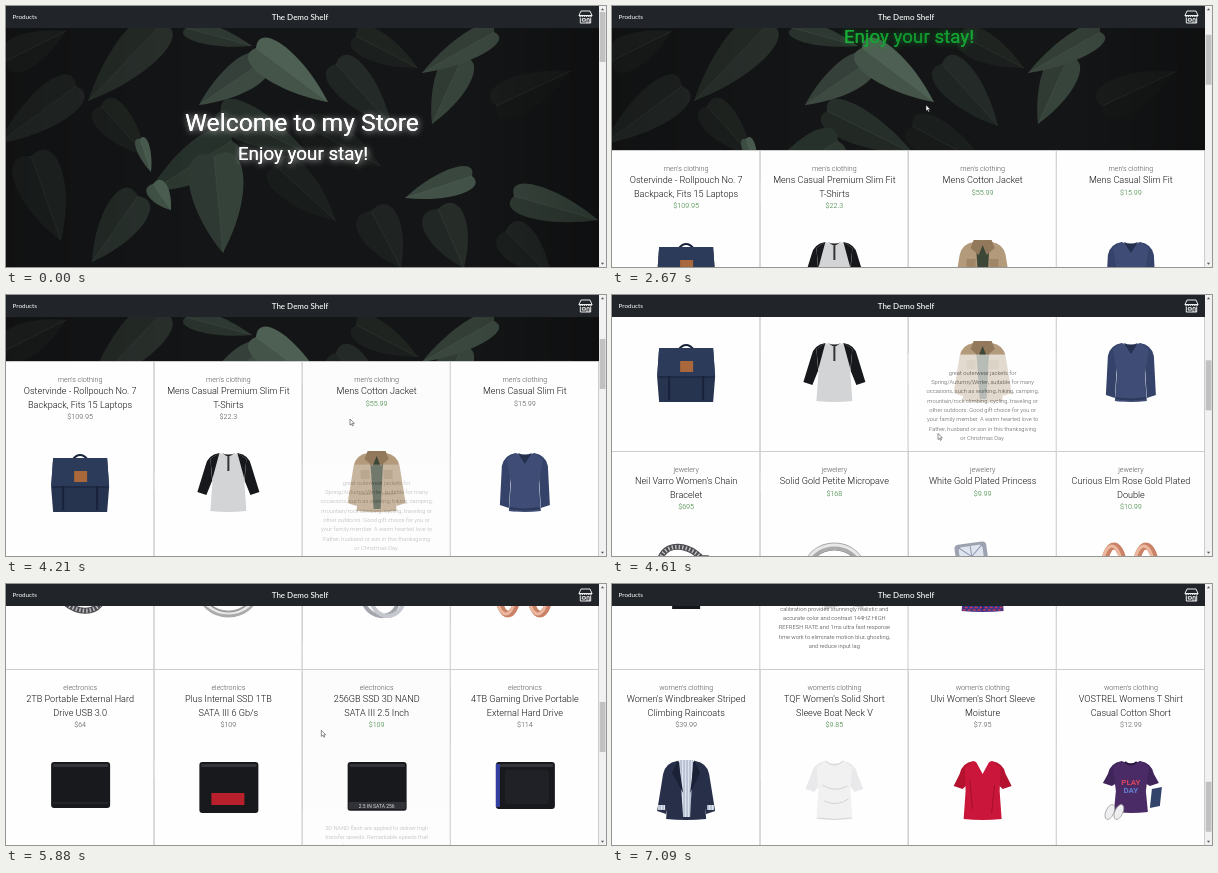
Animation, 600 px wide and 261 px high, one loop 7.42 s. Source, as an HTML page:

```html
<!DOCTYPE html>
<html lang="en">
<head>
<meta charset="utf-8">
<title>Store</title>
<style>
  html, body { margin: 0; width: 100%; height: 100%; overflow: hidden; background: #fdfdfd; }
  svg { display: block; width: 600px; height: 261px; }
  text { font-family: Roboto, sans-serif; text-anchor: middle; }
  .cat { font-size: 7.1px; font-weight: 300; fill: #555; }
  .title { font-size: 9.1px; font-weight: 300; fill: #111; }
  .price { font-size: 7.2px; font-weight: 300; }
  .desc { font-size: 5.75px; font-weight: 300; fill: #333; }
  .nav text { font-family: Lato, sans-serif; fill: #fff; }
  .big { font-size: 24.7px; font-weight: 400; }
  .sub { font-size: 18.8px; font-weight: 400; }
  #leaves { filter: blur(.5px); }
  #white { fill: #fff; filter: drop-shadow(0 0 .4px #fff) drop-shadow(1px 1px 3px rgba(255,255,255,.65)); }
  #green { fill: url(#neon); filter: drop-shadow(0 0 .4px #1b3) drop-shadow(0 0 3px rgba(10,170,40,.6)); }
</style>
</head>
<body>
<svg viewBox="0 0 600 261">
  <defs>
    <radialGradient id="neon" gradientUnits="userSpaceOnUse" cx="305" cy="130" r="115">
      <stop offset="0" stop-color="#0f8529"/><stop offset=".4" stop-color="#15a033"/><stop offset="1" stop-color="#22cc40"/>
    </radialGradient>
    <linearGradient id="shade">
      <stop offset="0" stop-color="#000" stop-opacity=".15"/><stop offset=".3" stop-color="#000" stop-opacity="0"/>
      <stop offset=".8" stop-color="#000" stop-opacity="0"/><stop offset="1" stop-color="#000" stop-opacity=".25"/>
    </linearGradient>
    <linearGradient id="view" x2="0" y2="1">
      <stop offset="0" stop-color="#9aa7a5"/><stop offset=".35" stop-color="#3c6b3c"/>
      <stop offset=".65" stop-color="#8b4b3f"/><stop offset="1" stop-color="#24402c"/>
    </linearGradient>
    <pattern id="dots" width="5" height="5" patternUnits="userSpaceOnUse">
      <rect width="5" height="5" fill="#2d3690"/><path d="M0 1h3M2 3.5h3" stroke="#cf3a52" stroke-width="1.5"/>
    </pattern>
    <pattern id="stripes" width="3" height="3" patternUnits="userSpaceOnUse">
      <rect width="3" height="3" fill="#e4e8f0"/><path d="M1 0v3" stroke="#8e9cba"/>
    </pattern>
  </defs>
  <rect width="593" height="261" fill="#141516"/>
  <g id="leaves"></g>
  <rect width="593" height="261" fill="url(#shade)"/>
  <g id="page">
    <g id="white"><text class="big" x="296" y="125">Welcome to my Store</text><text class="sub" x="297" y="154">Enjoy your stay!</text></g>
    <g id="green"><text class="big" x="296" y="125">Welcome to my Store</text><text class="sub" x="297" y="154">Enjoy your stay!</text></g>
    <g id="cards"></g>
  </g>
  <g class="nav">
    <rect width="593" height="22" fill="#212529"/>
    <text x="6.5" y="13.2" style="font-size:6.3px;text-anchor:start">Products</text>
    <text x="294" y="13.6" style="font-size:8px;font-weight:500">The Demo Shelf</text>
    <g fill="none" stroke="#fff" stroke-width=".9">
      <path d="M575 5h9l2 4.5h-13zM573 9.5q1.1 2.6 2.2 0q1.1 2.6 2.2 0q1.1 2.6 2.2 0q1.1 2.6 2.2 0q1.1 2.6 2.2 0q1 2.6 2 0M574.3 11.5v5.5h10.4v-5.5M576.3 12.7h3v2.4h-3zM581 17v-4.3h2.2v4.3"/>
    </g>
  </g>
  <rect x="593" width="7" height="261" fill="#f1f1f1"/>
  <path d="M594.9 4.3l1.6-2l1.6 2zM594.9 256.7l1.6 2l1.6-2z" fill="#555"/>
  <rect id="thumb" x="593.7" width="5.8" height="50" fill="#c1c1c1"/>
  <path id="cursor" d="M0 0v6l1.4-1.2l1 2.1l1-.5l-1-2h1.9z" fill="#fff" stroke="#222" stroke-width=".5"/>
</svg>
<script>
const LOOP = 7420, FIRST = 970, LAST = 7090;
const $ = id => document.getElementById(id);
const clamp = v => Math.max(0, Math.min(1, v));

// Fixed backdrop foliage: base x, y, tip x, y, half width, colour
const leaf = (x, y, tx, ty, w, color) => {
  const dx = tx - x, dy = ty - y, len = Math.hypot(dx, dy), a = Math.atan2(dy, dx) * 180 / Math.PI;
  const half = s => `M0 0C${-.16 * len} ${s * w * 1.25} ${.42 * len} ${s * w * 1.35} ${len} 0Z`;
  return `<g transform="translate(${x} ${y}) rotate(${a})"><path d="${half(1)}${half(-1)}" fill="${color}"/>` +
    `<path d="${half(1)}" fill="#000" opacity=".13"/><path d="M0 0H${len}" stroke="#9db3a4" stroke-width=".6" opacity=".13"/></g>`;
};
$('leaves').innerHTML = [
  [70, 80, -8, 138, 21, '#222725'], [25, 150, 55, 235, 25, '#1f2422'], [0, 55, 60, 25, 18, '#1d201f'],
  [156, 18, 82, 95, 22, '#29302c'], [95, 100, 140, 150, 18, '#1f2421'], [132, 190, 86, 256, 21, '#29312d'],
  [330, 58, 386, 120, 20, '#242a27'], [350, 30, 412, 62, 16, '#1f2421'], [270, 160, 330, 215, 20, '#1c201e'],
  [365, 205, 395, 262, 22, '#1f2422'], [432, 203, 458, 262, 22, '#262d29'], [490, 100, 565, 65, 20, '#191c1b'],
  [500, 225, 545, 270, 20, '#202523'], [300, 120, 375, 160, 20, '#1a1e1c'], [215, 105, 302, 148, 19, '#272f2a'],
  [226, 135, 143, 186, 22, '#2d3831'], [208, 150, 217, 247, 28, '#35423a'], [180, 22, 246, 40, 11, '#2f3933'],
  [256, 56, 193, 99, 17, '#3c4a41'], [250, 42, 322, 96, 19, '#4e6053'], [456, 52, 426, 118, 18, '#37443b'],
  [488, 26, 416, 67, 14, '#3a473e'], [466, 170, 399, 192, 14, '#435248'], [508, 190, 592, 214, 17, '#38453d'],
  [134, 133, 145, 166, 7, '#4b5d51'], [147, 178, 165, 204, 11, '#4b5e51']
].map(a => leaf(...a)).join('');

// Product pictures, drawn around their own centre
const box = (x, y, w, h, f, r = 0) => `<rect x="${x}" y="${y}" width="${w}" height="${h}" rx="${r}" fill="${f}"/>`;
const path = (d, f, more = '') => `<path d="${d}" fill="${f}" ${more}/>`;
const line = (d, s, w = 1) => path(d, 'none', `stroke="${s}" stroke-width="${w}"`);
const oval = (x, y, rx, ry, s, w, more = '') =>
  `<ellipse cx="${x}" cy="${y}" rx="${rx}" ry="${ry}" fill="none" stroke="${s}" stroke-width="${w}" ${more}/>`;
const sleeves = (f, out, end) => [1, -1].map(s =>
  path(`M${9 * s} -28Q${21 * s} -26 ${23 * s} -15L${out * s} ${end}L${(out - 9) * s} ${end + 3}L${14 * s} -6Z`, f)).join('');
const torso = (f, w = 18, end = 30) =>
  path(`M-9 -28Q0 -23 9 -28L18 -22L${w - 2} 2L${w} ${end}Q0 ${end + 2} ${-w} ${end}L${2 - w} 2L-18 -22Z`, f);
const neck = (f, d = 9) => path(`M-7 -28L0 ${d - 28}L7 -28Q0 -25 -7 -28Z`, f);
const coat = (f, inner) => sleeves(f, 29, 22) + torso(f, 20) + path('M-7 -29H7L4 28H-3Z', inner);
const drive = (end, extra = '', f = '#18191d') => box(-29, -27, 59, end + 27, f, 3) + box(-27, -25, 55, 3, '#33353b') + extra;

const pics = [
  [
    line('M-8 -21Q0 -31 8 -21', '#18223a', 2) + path('M-27 -23H27L29 6L27 31H-27L-29 6Z', '#27344f') + path('M-27 -23H27L29 5H-29Z', '#2d3b5a') +
      line('M-17 5V29M17 5V29', '#18223a', 2) + line('M-28 6H28', '#17213a') + box(-6, -10, 13, 11, '#a9683b'),
    sleeves('#17181b', 31, 11) + torso('#d3d4d6') + path('M-9 -28L-18 -22L-16 -2ZM9 -28L18 -22L16 -2Z', '#17181b') + neck('#222', 4) + line('M0 -24V-10', '#333', 2),
    coat('#b39a7b', '#3d4737') + path('M-9 -30L-12 -22L-4 -15L0 -25L4 -15L12 -22L9 -30Z', '#92795c') +
      box(-16, -11, 9, 9, '#9f8667') + box(7, -11, 9, 9, '#9f8667') + line('M-18 13H-6M6 13H18', '#8a7256'),
    sleeves('#35436a', 25, 24) + torso('#3f4d76', 16) + neck('#252f4e', 11) + line('M-15 27Q0 30 15 27', '#2d395c', 2)
  ],
  [
    oval(-2, 0, 27, 20, '#4c4c50', 6, 'transform="rotate(38)"') + oval(-2, 0, 27, 20, '#bcbcc0', 4, 'stroke-dasharray="1.5 2" transform="rotate(38)"') +
      box(-22, 9, 9, 8, '#5a5a5e', 3) + box(15, -16, 9, 11, '#77777c', 3),
    oval(0, 0, 28, 25, '#aaa', 7) + oval(0, -1, 29, 25, '#e8e8e8', 3) + oval(0, 1, 25, 22, '#888', 1),
    oval(2, 8, 18, 20, '#a4a6ad', 4, 'transform="rotate(-15)"') + oval(11, 7, 17, 20, '#c6c8cf', 4) +
      `<g transform="translate(-11 -15) rotate(-8)">${box(-16, -13, 32, 27, '#9da2b0', 4)}${box(-12, -10, 24, 21, '#dfe4ee', 3)}${line('M-12 -10L12 11M12 -10L-12 11M0 -10V11', '#8f9ab3')}</g>`,
    [-17, 15].map(x => oval(x, 0, 10, 25, '#c98265', 7) + oval(x - 2, 0, 10, 25, '#ecb79f', 3)).join('')
  ],
  [
    drive(19, line('M-27 14H28', '#2f3137')),
    drive(24, box(-17, 4, 33, 12, '#b8202b')),
    drive(22, box(-28, 13, 57, 7, '#303238') + '<text y="19" style="font-size:5px;fill:#ddd">2.5 IN SATA 256</text>'),
    drive(20, box(-29, -25, 4, 43, '#333fa0') + box(-20, -19, 44, 34, '#202127', 3))
  ],
  [
    box(-30, -28, 60, 43, '#16171a') + box(-28, -26, 56, 38, 'url(#view)') + line('M-28 4Q-10 -14 5 0T28 -6', '#b4c169', 2) +
      path('M-3 15H3L4 26H14V30H-14V26H-4Z', '#16171a'),
    path('M-30 -21Q0 -21 30 -25V10Q0 4 -25 18Z', '#111216') + path('M-28 -19Q0 -19 23 -22V7Q-4 6 -24 15Z', '#20262e') +
      line('M9 9L12 24M12 24L-10 29M12 24L29 28', '#25262a', 3) +
      '<g transform="translate(16 -6) rotate(-6)"><text style="font-size:6px;font-weight:700;fill:#eee">WIDE</text><text y="6" style="font-size:6px;font-weight:700;fill:#eee">VIEW</text></g>',
    sleeves('url(#dots)', 30, 23) + torso('url(#dots)', 21, 32) + path('M-11 -20Q-13 -32 0 -32Q13 -32 11 -20Q0 -13 -11 -20Z', '#29327f') + line('M0 -18V31', '#1b2057'),
    sleeves('#202124', 29, 24) + torso('#292a2d', 17, 26) + path('M-9 -28L-12 -19L0 -8L12 -19L9 -28Z', '#111') + line('M2 -9L-1 26M-14 10H-6M7 10H14', '#5b5c60')
  ],
  [
    coat('#272f49', 'url(#stripes)') + path('M-8 -29L-14 -16L-3 4ZM8 -29L14 -16L4 4Z', '#1b2238') + box(-28, 16, 7, 5, 'url(#stripes)') + box(21, 16, 7, 5, 'url(#stripes)'),
    sleeves('#e9e9eb', 29, 0) + torso('#f1f1f2', 18) + line('M-9 -28Q0 -20 9 -28M-12 -4Q0 4 13 -3M-10 12Q2 18 14 10M-17 29Q0 32 17 29', '#d3d3d6'),
    sleeves('#b5122f', 29, -3) + torso('#c9163a', 19) + neck('#fff', 13) + line('M-13 -9L-10 20M12 -4L9 24', '#a60f2b'),
    path('M21 0L31 -2L29 17L19 19Z', '#33446b') + sleeves('#40255b', 28, -6) + torso('#4a2b66', 17, 23) + line('M-6 -27Q0 -22 6 -27', '#2c1842', 2) +
      '<text y="-4" style="font-size:8px;font-weight:700;fill:#d8465e">PLAY</text><text y="4" style="font-size:8px;font-weight:700;fill:#6380cf">DAY</text>' +
      [-21, -12].map(x => `<ellipse cx="${x}" cy="23" rx="4" ry="8" fill="#eeeef0" stroke="#999" stroke-width=".7" transform="rotate(24 ${x} 23)"/>`).join('')
  ]
];

const goods = [
  ["men's clothing", ['Ostervinde - Rollpouch No. 7|Backpack, Fits 15 Laptops', '$109.95'], ['Mens Casual Premium Slim Fit|T-Shirts', '$22.3'], ['Mens Cotton Jacket', '$55.99'], ['Mens Casual Slim Fit', '$15.99']],
  ['jewelery', ["Neil Varro Women's Chain|Bracelet", '$695'], ['Solid Gold Petite Micropave', '$168'], ['White Gold Plated Princess', '$9.99'], ['Curious Elm Rose Gold Plated|Double', '$10.99']],
  ['electronics', ['2TB Portable External Hard|Drive USB 3.0', '$64'], ['Plus Internal SSD 1TB|SATA III 6 Gb/s', '$109'], ['256GB SSD 3D NAND|SATA III 2.5 Inch', '$109'], ['4TB Gaming Drive Portable|External Hard Drive', '$114']],
  ['electronics', ['Yexo MK530L 21.5 inches Full|HD IPS Ultra-Thin', '$599'], ['Tarvond 49-Inch LPW40 –|Super Ultrawide Screen QLED', '$999.99'], ["QUORVANDELE Women's 3-in-1|Snowboard Jacket", '$56.99'], ["Dusk Women's Faux Leather|Moto Biker Jacket", '$29.95']],
  ["women's clothing", ["Women's Windbreaker Striped|Climbing Raincoats", '$39.99'], ["TQF Women's Solid Short|Sleeve Boat Neck V", '$9.85'], ["Ulvi Women's Short Sleeve|Moisture", '$7.95'], ['VOSTREL Womens T Shirt|Casual Cotton Short', '$12.99']]
];
// The fourth row mixes two categories
const category = (r, c) => goods[r === 3 && c > 1 ? 4 : r][0];

const notes = {
  '01': 'Slim-fitting style, contrast raglan long|sleeve, three-button henley placket, light|weight and soft fabric for breathable and|comfortable wearing. Solid stitched shirts|with round neck made for durability.',
  '02': 'great outerwear jackets for|Spring/Autumn/Winter, suitable for many|occasions, such as working, hiking, camping,|mountain/rock climbing, cycling, traveling or|other outdoors. Good gift choice for you or|your family member. A warm hearted love to|Father, husband or son in this thanksgiving|or Christmas Day.',
  11: 'Satisfaction Guaranteed. Return or exchange|any order within 30 days.Designed and sold|by Morvik Bazaar in the United States.|Satisfaction Guaranteed. Return or exchange|any order within 30 days.',
  22: '3D NAND flash are applied to deliver high|transfer speeds. Remarkable speeds that|enable faster bootup and improved overall|system performance.',
  31: '49 INCH SUPER ULTRAWIDE 32:9 CURVED|GAMING MONITOR with dual 27 inch screen|side by side QUANTUM DOT (QLED)|TECHNOLOGY, HDR support and factory|calibration provides stunningly realistic and|accurate color and contrast 144HZ HIGH|REFRESH RATE and 1ms ultra fast response|time work to eliminate motion blur, ghosting,|and reduce input lag',
  32: 'Note:The Jackets is US standard size, Please|choose size as your usual wear Material:|100% Polyester; Detachable Liner Fabric:|Warm Fleece. Detachable Functional Liner:|Skin Friendly, Lightweight and Warm. Stand|Collar Liner jacket, keep you warm in cold|weather. Zippered Pockets: 2 Zippered Hand|Pockets, 2 Zippered Pockets on Chest|(enough to keep cards or keys) and 1 Hidden|Pocket Inside. Zippered Hand Pockets and|Hidden Pocket keep your things secure.|Humanized Design: Adjustable and|Detachable Hood and Adjustable cuff to|prevent the wind and water, for a|comfortable fit. 3 in 1 Detachable Design|provide more convenience, you can separate|the coat and inner as needed, or wear it|together. It is suitable for different|season and different climates'
};

const colW = 148.25, rowTop = [261, 461, 661, 861, 1071, 1280];
const label = (cls, y, s) => `<text class="${cls}" x="${colW / 2}" y="${y}">${s}</text>`;

const card = (r, c) => {
  const [name, price] = goods[r][c + 1], h = rowTop[r + 1] - rowTop[r], lines = name.split('|');
  const note = notes[`${r}${c}`], rows = note ? note.split('|') : [];
  const first = 189 - 9.35 * (rows.length - 1), top = Math.max(0, first - 20);
  return `<g id="card${r}${c}" transform="translate(${c * colW} ${rowTop[r]})">` +
    `<rect width="${colW}" height="${h}" fill="#fefefe"/><rect class="tint" width="${colW}" height="${h}" fill="#e9e9ea" opacity="0"/>` +
    label('cat', 20.5, category(r, c)) + lines.map((s, i) => label('title', 33.4 + 13.3 * i, s)).join('') +
    label('price', 45 + 13 * (lines.length - 1), price) +
    `<g transform="translate(${colW / 2} 120)">${pics[r][c]}</g>` +
    `<g class="note" opacity="0"><rect y="${top}" width="${colW}" height="${h - top}" fill="#fff" opacity=".78"/>` +
    rows.map((s, i) => label('desc', first + 9.35 * i, s)).join('') + '</g>' +
    `<path d="M${colW - .5} 0V${h}M0 .5H${colW}" fill="none" stroke="#c8c8c8" stroke-width=".9"/></g>`;
};
$('cards').innerHTML = goods.map((_, r) => [0, 1, 2, 3].map(c => card(r, c)).join('')).join('');

const cards = [...$('cards').children].map(el => ({
  id: el.id.slice(4), tint: el.querySelector('.tint'), note: el.querySelector('.note'), price: el.querySelector('.price')
}));

// Motion tables: time, value(s)
const scrollKeys = [[1700, 0], [2300, 117], [2760, 117], [3180, 195], [4210, 195], [4700, 330], [5100, 373], [5260, 373],
  [5700, 540], [6000, 600], [6320, 752], [6640, 752], [7060, 986]];
const cursorKeys = [[970, 400, 222], [1500, 328, 109], [1700, 328, 109], [2670, 314, 99], [3200, 320, 104], [3350, 296, 110],
  [3500, 280, 110], [3700, 288, 64], [3900, 320, 45], [4080, 340, 64], [4210, 344, 124], [4500, 344, 135], [5100, 247, 154],
  [5260, 247, 154], [5700, 290, 150], [6200, 360, 140], [6390, 379, 132], [6550, 340, 140], [6700, 235, 150], [7060, 222, 190]];
// Card, pointer enters, pointer leaves
const hovers = [['02', 2950, 3350], ['01', 3350, 3700], ['02', 4090, 4420], ['11', 4800, 5400], ['22', 5760, 6150],
  ['32', 6280, 6620], ['31', 6620, 6960], ['41', 7085, LOOP]];

const at = (keys, t) => {
  const i = keys.findIndex(k => k[0] > t);
  if (i < 0) return keys[keys.length - 1].slice(1);
  if (!i) return keys[0].slice(1);
  const a = keys[i - 1], b = keys[i], p = (t - a[0]) / (b[0] - a[0]);
  return a.slice(1).map((v, j) => v + (b[j + 1] - v) * p);
};

function draw(t) {
  const scroll = Math.round(at(scrollKeys, t)[0]);
  $('page').setAttribute('transform', `translate(0 ${-scroll})`);
  $('thumb').setAttribute('y', 6 + scroll * .1945);
  const glow = clamp((t - 1000) / 350);
  $('white').style.opacity = 1 - glow;
  $('green').style.opacity = glow;
  const [x, y] = at(cursorKeys, t);
  $('cursor').setAttribute('transform', `translate(${x} ${y})`);
  $('cursor').style.display = t > FIRST && t < 7060 ? '' : 'none';
  for (const c of cards) {
    let tint = 0, note = 0, over = false;
    for (const [id, from, to] of hovers) {
      if (id !== c.id || t < from) continue;
      const peak = clamp((Math.min(t, to) - from) / 350);
      tint = Math.max(tint, peak * (1 - clamp((t - to) / 130)));
      note = Math.max(note, peak * (1 - clamp((t - to - 150) / 300)));
      over = over || t < to;
    }
    c.tint.setAttribute('opacity', tint * tint);
    c.note.setAttribute('opacity', note);
    c.price.setAttribute('fill', over || t < 3200 || c.id[0] === '1' ? '#2f7d32' : '#4a4f4a');
  }
}

const start = performance.now();
function tick() {
  const t = (performance.now() - start) % LOOP;
  draw(t < FIRST ? 0 : Math.min(t, LAST));
  requestAnimationFrame(tick);
}
tick();
</script>
</body>
</html>
```
